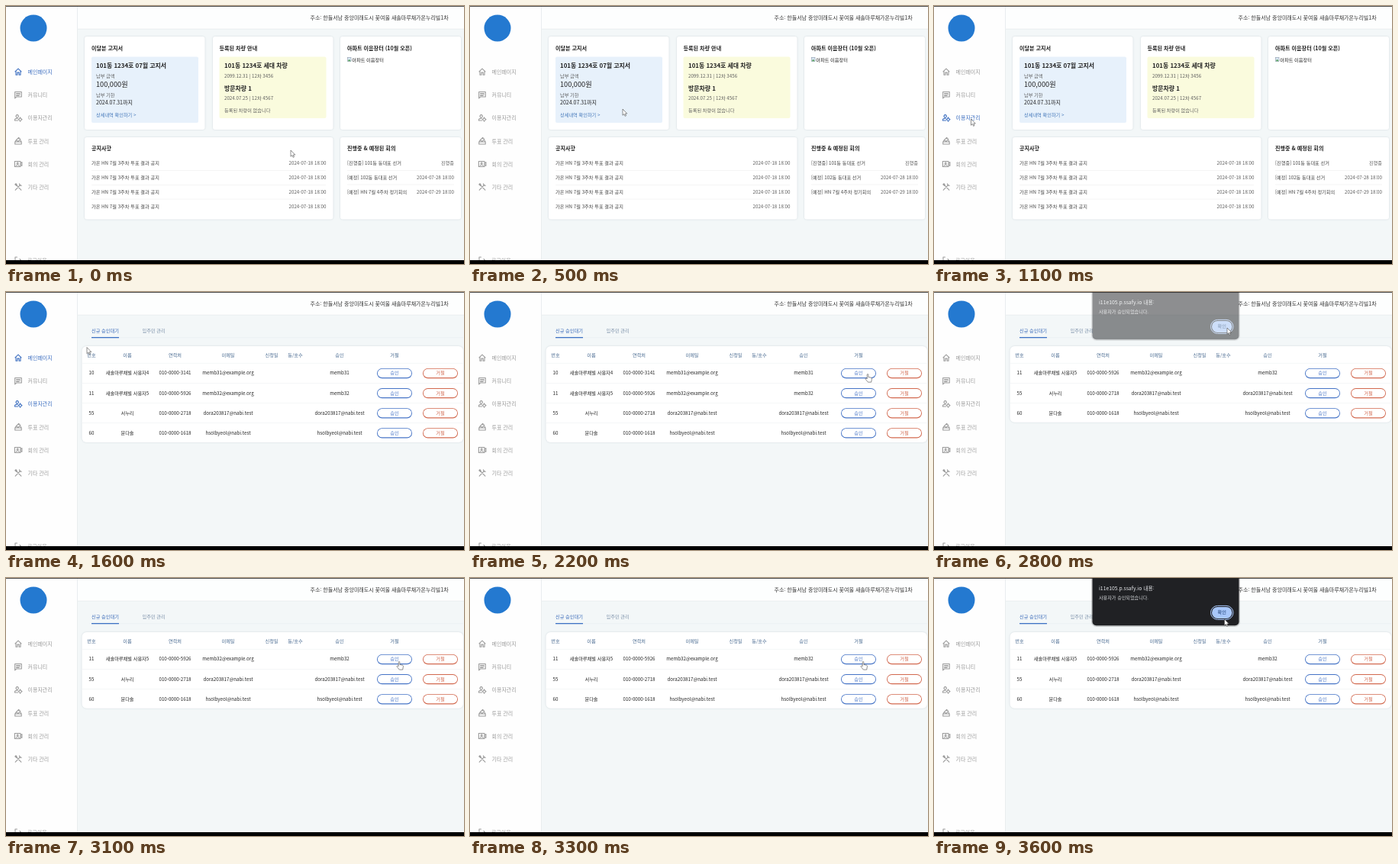
Write an HTML page that moves like this. It is 600 px wide and 338 px high and loops after 3.7 s.

```html
<!DOCTYPE html>
<html lang="ko">
<head>
<meta charset="utf-8">
<title>아파트 관리</title>
<style>
html, body { margin: 0; width: 100%; height: 100%; overflow: hidden; background: #000; }
svg { display: block; width: 100vw; height: 100vh; }
text { font-family: "Noto Sans CJK KR", "Noto Sans CJK", "Noto Sans", sans-serif; white-space: pre; }
.card { fill: #fff; filter: drop-shadow(0 .8px 1.2px rgba(40, 60, 80, .16)); }
.ico { fill: none; stroke: currentColor; stroke-width: 1.1; stroke-linejoin: round; stroke-linecap: round; }
</style>
</head>
<body>
<svg id="stage" viewBox="0 0 600 338"></svg>
<script>
const LOOP = 3700, STEP = 100;
const INK = '#222', MUTED = '#5c5c5c', GRAY = '#9b9b9b', BLUE = '#3d6fc0', RED = '#d2694f';

const text = (x, cy, s, size = 6.2, fill = INK, weight = 400, anchor = 'start') =>
  `<text x="${x}" y="${cy + size * 0.36}" font-size="${size}" fill="${fill}" font-weight="${weight}" text-anchor="${anchor}">${s}</text>`;
const mid = (x, cy, s, size, fill, weight) => text(x, cy, s, size, fill, weight, 'middle');
const end = (x, cy, s, size, fill, weight) => text(x, cy, s, size, fill, weight, 'end');
const rect = (x, y, w, h, fill, r = 0, extra = '') =>
  `<rect x="${x}" y="${y}" width="${w}" height="${h}" rx="${r}" fill="${fill}" ${extra}/>`;
const card = (x, y, w, h, r = 3) => rect(x, y, w, h, '#fff', r, 'class="card"');
const rule = (x1, x2, y, color = '#efefef') => rect(x1, y, x2 - x1, 0.6, color);
const group = (id, body) => `<g id="${id}">${body}</g>`;

// Side menu: label and icon path, centred on 0,0
const menu = [
  ['메인페이지', 'M-4 -.5L0-4.2 4-.5M-3-1.2V4H-1.1V.8H1.1V4H3V-1.2'],
  ['커뮤니티', 'M-4.3-4H4.3V2.6H-2.4L-4.3 4.4ZM-2.4-2H2.4M-2.4-.5H2.4M-2.4 1H1'],
  ['이용자관리', 'M-1.3-4a1.7 1.7 0 1 0 .01 0M-4.5 3.4V2.4C-4.5 .8-2 .4-.6 .6M-4.5 3.4H-.5M2.6 .3a1.7 1.7 0 1 0 .01 0M2.6-.7V.3M2.6 3.7V4.7M.2 2H.9M4.3 2H5'],
  ['투표 관리', 'M-4.2 1.2H4.2V4.3H-4.2ZM-4.2 1.2L-3-.6M4.2 1.2L3-.6M-2.4-1.3L.6-4.3 2.8-2.1-.2 .9Z'],
  ['회의 관리', 'M-4.6-3.4H3V3.6H-4.6ZM3-.6L4.9-2.2V2.4L3 .8M-.8-1.9a1 1 0 1 0 .01 0M-2.8 2.2C-2.4 .7 .8 .7 1.2 2.2'],
  ['기타 관리', 'M-3.8 4L3-2.9M1.6-4.2C1.4-2.4 2.4-1.6 4.3-1.8M3.9 4L-2.8-2.8M-4.2-3.2L-3-4.4-1.6-2.4-2.3-1.7Z']
];
const menuItem = ([label, path], i) => {
  const y = 86.3 + i * 30.15;
  return `<g id="m${i}"><path class="ico" d="${path}" transform="translate(16 ${y})"/>` +
    text(28.5, y + 0.3, label, 7, 'currentColor') + '</g>';
};

const chrome =
  rect(0, 0, 600, 338, '#f3f7f8') +
  rect(94, 0, 506, 30, '#fdfefe') + rule(94, 600, 29.8, '#e0e5e8') +
  rect(0, 0, 93.5, 338, '#fefefe') + rect(93.3, 0, 0.7, 338, '#e3e7ea') +
  '<circle cx="36" cy="29" r="17.5" fill="#2479d0"/>' +
  text(398.5, 15.8, '주소: 한들서남 중앙미래도시 꽃여울 새솔마루채가온누리빌1차', 7, '#333') +
  menu.map(menuItem).join('') +
  `<g color="${GRAY}"><path class="ico" d="M14.5 329H12V338M15 333.5H20M18 331.5L20 333.5"/>` +
  text(28, 333.4, '로그아웃', 7, GRAY) + '</g>';

const notices = [206, 225, 243.7, 262.4].map((y, i) =>
  text(112, y, '가온 HN 7월 3주차 투표 결과 공지', 6.2, '#444') +
  end(419.5, y, '2024-07-18 18:00', 6.2, MUTED) +
  (i < 3 ? rule(112, 419, y + 9) : '')).join('');
const meetings = [
  ['[진행중] 101동 동대표 선거', '진행중'],
  ['[예정] 102동 동대표 선거', '2024-07-28 18:00'],
  ['[예정] HN 7월 4주차 정기회의', '2024-07-29 18:00']
].map(([a, b], i) => {
  const y = 206 + i * 18.7;
  return text(447, y, a, 6.2, '#444') + end(587, y, b, 6.2, MUTED) + (i < 2 ? rule(447, 587, y + 9) : '');
}).join('');

const home =
  card(103, 40, 157.5, 122) + card(271, 40, 157.5, 122) + card(438, 40, 158, 122) +
  card(103, 172, 325.5, 107.5) + card(438, 172, 158, 107.5) +
  text(112, 55, '이달분 고지서', 7.1, INK, 700) +
  rect(112, 66.5, 140, 86.5, '#e7f1fb', 2) +
  text(118, 78.3, '101동 1234호 07월 고지서', 7.9, INK, 700) +
  text(118, 91.3, '납부 금액', 6.2, MUTED) +
  text(118, 102.3, '100,000원', 9.2, INK, 500) +
  text(118, 116.3, '납부 기한', 6.2, MUTED) +
  text(118, 126.3, '2024.07.31까지', 7, INK) +
  text(118, 142.5, '상세내역 확인하기 &gt;', 6.2, '#3f74b8') +
  text(279.5, 55, '등록된 차량 안내', 7.1, INK, 700) +
  rect(279.5, 66.5, 140, 80.5, '#fafbdd', 2) +
  text(286, 78.3, '101동 1234호 세대 차량', 7.9, INK, 700) +
  text(286, 91.5, '2099.12.31 | 12차 3456', 6.2, MUTED) +
  text(286, 107.8, '방문차량 1', 7.9, INK, 700) +
  text(286, 120.8, '2024.07.25 | 12차 4567', 6.2, MUTED) +
  text(286, 136.3, '등록된 차량이 없습니다', 6.2, MUTED) +
  text(447, 55, '아파트 이음장터 (10월 오픈)', 7.1, INK, 700) +
  rect(447.4, 67.3, 4.6, 5.2, '#dbe7f5', 0, 'stroke="#8b99a8" stroke-width=".6"') +
  '<path d="M447.7 72.2L449.6 69.8 451.8 72.2Z" fill="#58a55c"/>' +
  text(453.3, 71, '아파트 이음장터', 6.2, INK) +
  text(112, 186.3, '공지사항', 7.1, INK, 700) + notices +
  text(447, 186.3, '진행중 &amp; 예정된 회의', 7.1, INK, 700) + meetings;

const cols = [112, 159, 221.5, 291, 348, 379, 437];
const members = [
  ['10', '새솔마루채빌 사용자4', '010-0000-3141', 'memb31@example.org', '', '', 'memb31'],
  ['11', '새솔마루채빌 사용자5', '010-0000-5926', 'memb32@example.org', '', '', 'memb32'],
  ['55', '서누리', '010-0000-2718', 'dora203817@nabi.test', '', '', 'dora203817@nabi.test'],
  ['60', '문다솔', '010-0000-1618', 'hsolbyeol@nabi.test', '', '', 'hsolbyeol@nabi.test']
];
const pill = (x, cy, label, color) =>
  rect(x, cy - 6.2, 46, 13.2, color, 6.6) +
  rect(x + 0.9, cy - 5.4, 44.2, 11.2, '#fff', 5.6) +
  mid(x + 23, cy, label, 6.2, color);
const table = rows =>
  card(99.5, 71, 499.5, 21.5 + rows.length * 26.1, 6) +
  ['번호', '이름', '연락처', '이메일', '신청일', '동/호수', '승인', '거절'].map((h, i) =>
    mid([...cols, 509][i], 82.3, h, 6.2, '#46688f', 500)).join('') +
  rows.map((row, r) => {
    const y = 106.2 + r * 26.1;
    return rule(100, 598.5, y - 13.3, '#eef1f3') +
      row.map((s, i) => mid(cols[i], y, s, 6.2, INK)).join('') +
      pill(486, y, '승인', '#4674c6') + pill(546, y, '거절', RED);
  }).join('');
const tabs =
  text(112, 51, '신규 승인대기', 6.2, '#2f62b5', 500) +
  text(178.5, 51, '입주민 관리', 6.2, '#7a8fa8') +
  rule(112, 599, 59.6, '#e4eaed') + rect(112, 59, 36, 1.3, '#3d72c4');

const dialog =
  rect(206, -6, 195, 70, '#000', 7, 'opacity=".18"') +
  rect(207.5, -6, 192, 68.3, '#202124', 5) +
  text(216, 13.7, 'i11e105.p.ssafy.io 내용:', 6.8, '#e8eaed') +
  text(216, 26.3, '사용자가 승인되었습니다.', 6.1, '#d5d7da') +
  rect(362.5, 36.4, 29.5, 18, '#202124', 9, 'stroke="#a8c7fa" stroke-width="1"') +
  rect(364, 37.9, 26.5, 15, '#a8c7fa', 7.5) +
  mid(377.2, 45.2, '확인', 6.2, '#173a70', 500);

const arrow = '<path d="M0 0V8.2L1.9 6.5 3.1 9.3 4.5 8.7 3.3 6H5.8Z" fill="#fff" stroke="#444" stroke-width=".6"/>';
const hand = '<path d="M2.2 5.6V.9C2.2-.3 3.9-.3 3.9 .9V4L7 4.6C8.2 4.8 8.6 5.5 8.4 6.6L7.7 10.6H3.4L.2 6.8C-.3 5.9 .9 5 1.6 5.6L2.2 6.2Z" fill="#fff" stroke="#444" stroke-width=".6"/>';

document.getElementById('stage').innerHTML =
  chrome + group('home', home) +
  group('users', tabs + group('full', table(members)) + group('cut', table(members.slice(1)))) +
  group('dialog', dialog) +
  rect(0, 0, 600, 0.8, '#222') + rect(0, 333, 600, 5, '#000') +
  group('cursor', group('arrow', arrow) + group('hand', hand));

const el = id => document.getElementById(id);
const show = (id, on) => el(id).setAttribute('display', on ? 'inline' : 'none');
const within = (t, spans) => spans.some(([a, b]) => t >= a && t < b);

// time, x, y of the pointer
const path = [
  [0, 373, 189], [200, 52, 234], [400, 44, 140], [600, 356, 130], [700, 44, 88],
  [800, 47, 140], [1000, 47, 140], [1100, 48.5, 148], [1200, 48.5, 148], [1400, 38, 88],
  [1600, 106, 72.5], [1700, 150, 76], [2100, 500, 106], [2200, 518, 107.5], [2300, 518, 107.5],
  [2600, 384, 47], [2800, 384, 47], [3100, 512, 109.5], [3300, 512, 109.5], [3600, 380.5, 54]
];
const lit = { 0: [[0, 100], [700, 800], [1400, 1700]], 2: [[400, 500], [800, 1700]], 5: [[200, 300]] };

function pointer(t) {
  const i = path.findIndex(k => k[0] >= t);
  if (i < 0) return path[path.length - 1].slice(1);
  if (i === 0) return path[0].slice(1);
  const [t0, x0, y0] = path[i - 1], [t1, x1, y1] = path[i];
  const p = (t - t0) / (t1 - t0);
  return [x0 + (x1 - x0) * p, y0 + (y1 - y0) * p];
}

function draw(time) {
  const t = Math.floor((time % LOOP) / STEP) * STEP;
  const [x, y] = pointer(t);
  el('cursor').setAttribute('transform', `translate(${x} ${y})`);
  const onButton = x > 486 && x < 532 && y > 99;
  show('hand', onButton);
  show('arrow', !onButton);
  menu.forEach((_, i) => el('m' + i).setAttribute('color', within(t, lit[i] || []) ? BLUE : GRAY));
  show('home', t < 1200);
  show('users', t >= 1200);
  show('full', t < 2800);
  show('cut', t >= 2800);
  show('dialog', within(t, [[2400, 2900], [3400, LOOP]]));
  el('dialog').setAttribute('opacity', t === 2800 ? 0.5 : 1);
}

const start = performance.now();
function tick() {
  draw(performance.now() - start);
  requestAnimationFrame(tick);
}
tick();
</script>
</body>
</html>
```
